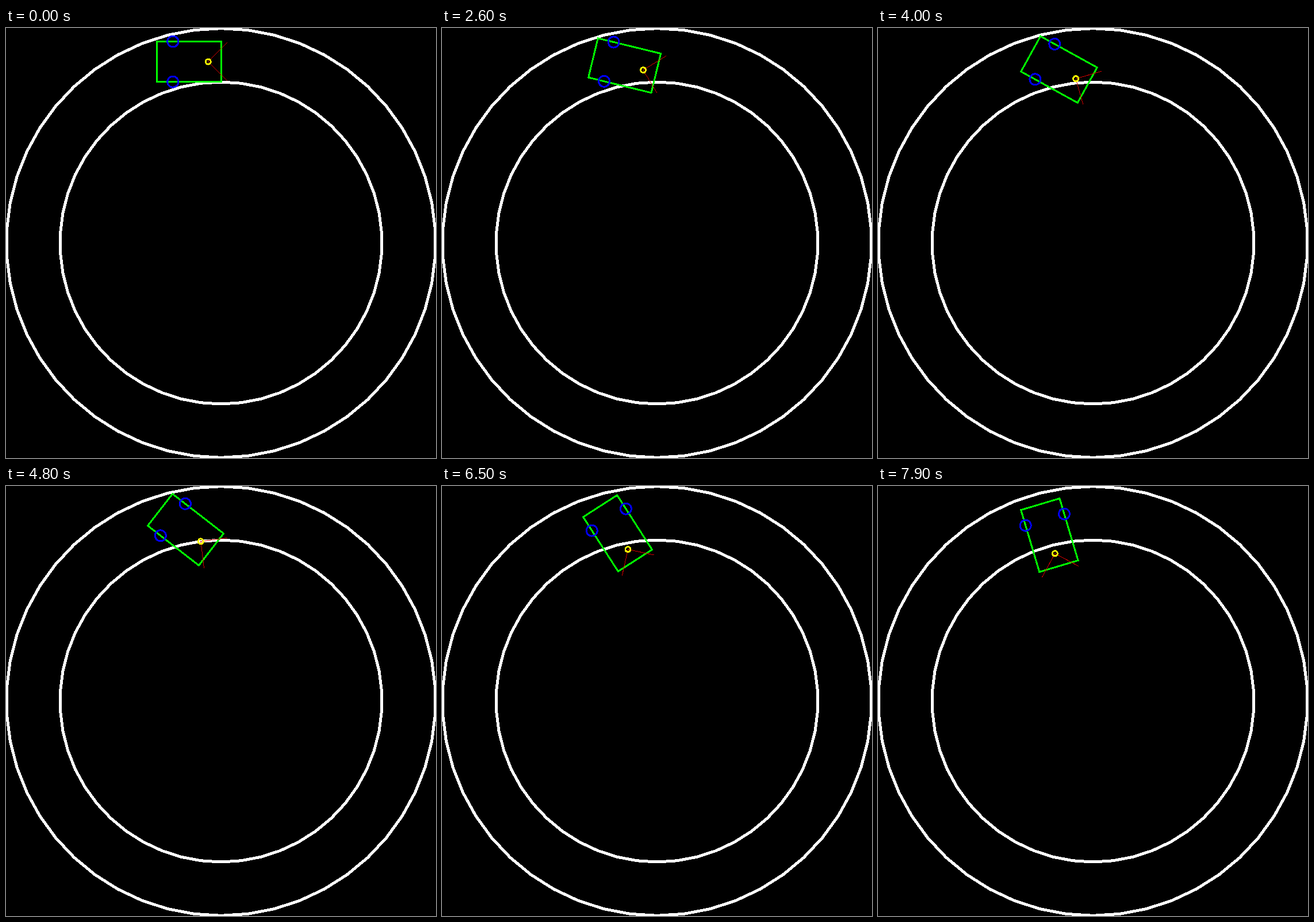
Animation of 748x748 px, one loop 8 s. Source, as an HTML page:

```html
<!DOCTYPE html>
<html lang="en">
<head>
<meta charset="utf-8">
<title>Car on a ring track</title>
<style>
  html, body { margin: 0; width: 100%; height: 100%; overflow: hidden; background: #000; }
  svg { display: block; width: 100vw; height: 100vh; shape-rendering: crispEdges; }
  svg * { fill: none; }
  .track { stroke: #fff; stroke-width: 5; }
  .body { stroke: #0f0; stroke-width: 3; }
  .wheel { stroke: #00f; stroke-width: 3; }
  .ray { stroke: #d00000; stroke-width: 1; }
  .sensor { stroke: #ff0; stroke-width: 3; }
</style>
</head>
<body>
<svg viewBox="0 0 748 748">
  <polygon class="track" id="outer"/>
  <polygon class="track" id="inner"/>
  <g id="car">
    <rect class="body" x="-28.1" y="-35.1" width="112.5" height="70.2"/>
    <circle class="wheel" cy="-35.1" r="9.5"/>
    <circle class="wheel" cy="35.1" r="9.5"/>
    <path class="ray" d="M94.4 -33.2L61.4 0L94.4 33.2"/>
    <circle class="sensor" cx="61.4" r="4.5"/>
  </g>
</svg>
<script>
const LOOP = 8000, STEP = 100, START = 8;
const SIDES = 50, CENTER = 374;
const car = document.getElementById('car');

// Step since start, heading in degrees, turn rate per step
const keys = [
  [0, 0, 0], [8, 3.2, 0.84], [18, 13.7, 1.07], [32, 28.9, 1.1],
  [47, 45.8, 1.14], [57, 57.3, 1.15], [71, 73.4, 1.15]
];

function ring(id, radius) {
  const points = Array.from({ length: SIDES }, (_, i) => {
    const a = i * 2 * Math.PI / SIDES;
    return [CENTER + radius * Math.sin(a), CENTER - radius * Math.cos(a)]
      .map(v => v.toFixed(2)).join();
  });
  document.getElementById(id).setAttribute('points', points.join(' '));
}

function heading(n) {
  if (n <= 0) return 0;
  const i = Math.max(1, keys.findIndex(k => n <= k[0]));
  const [n0, a0, v0] = keys[i - 1], [n1, a1, v1] = keys[i];
  const h = n1 - n0, u = (n - n0) / h, w = 1 - u;
  return w * w * ((1 + 2 * u) * a0 + u * h * v0)
       + u * u * ((1 + 2 * w) * a1 - w * h * v1);
}

function draw(ms) {
  const n = Math.floor((ms % LOOP) / STEP) - START;
  car.setAttribute('transform', `translate(290.3 58.6) rotate(${heading(n).toFixed(2)})`);
}

ring('outer', 373.3);
ring('inner', 280);

let begin = null;
function tick(now) {
  if (begin === null) begin = now;
  draw(now - begin);
  requestAnimationFrame(tick);
}
draw(0);
requestAnimationFrame(tick);
</script>
</body>
</html>
```
